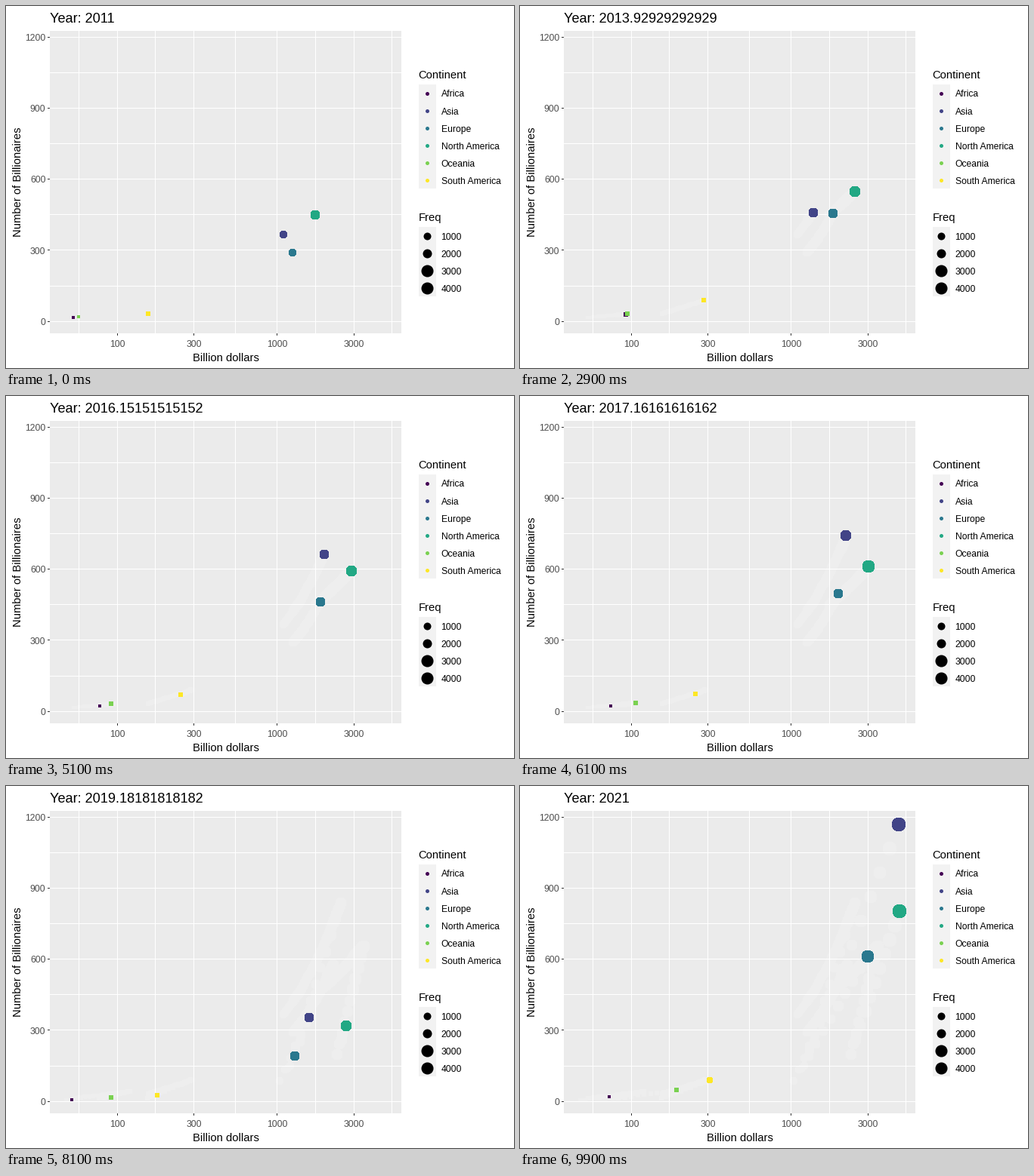
A matplotlib script that plays this animation: 672x480 px, repeating every 10 s.

```python
import numpy as np
import matplotlib.pyplot as plt
from matplotlib.animation import FuncAnimation
from matplotlib.patches import Rectangle

W, H, DPI = 672, 480, 96
FRAMES, INTERVAL = 100, 100
PT = 72 / DPI
FIRST, SPAN = 2011, 10
plt.rcParams["font.family"] = "Liberation Sans"

# Wealth in billion dollars at the turning points, then the number of
# billionaires: first value, growth exponent, last value.
YEARS = [2011, 2013, 2014, 2015, 2017, 2018, 2019, 2020]
CONTINENTS = {
    "Africa": ("#440154", [53, 70, 96, 87.5, 72, 48, 73], (17, 0.9, 19)),
    "Asia": ("#414487", [1092, 1233, 1380, 1747, 2131, 1204, 4682], (367, 1, 1169)),
    "Europe": ("#2A788E", [1250, 1486, 1861, 1780, 1901, 1034, 2982], (289, 1.2, 613)),
    "North America": ("#22A884", [1722, 2099, 2541, 2802, 2952, 2350, 4732], (449, 0.54, 803)),
    "Oceania": ("#7AD151", [57.5, 83, 96, 77.3, 103, 76, 192], (20, 1, 48)),
    "South America": ("#FDE725", [156, 279, 286, 253, 245, 154, 311], (33, 1.65, 91)),
}
COLORS = [c[0] for c in CONTINENTS.values()]
GROWTH_2018 = 1.17
SHARE_2019 = 0.37


def x_at(dollars):
    return 147 + 211.95 * (np.log10(dollars) - 2)


def y_at(count):
    return 418.25 - 47.15 / 150 * np.asarray(count)


def radius(dollars):
    share = np.clip((np.asarray(dollars) - 48) / 4684, 0, 1)
    return 1.9 + 7.1 * np.sqrt(share)


def area(r):
    return (2 * PT * np.asarray(r)) ** 2


def path(wealth, first, power, last):
    """Position and radius in every frame, straight between turning points."""
    d = np.insert(np.array(wealth, float), 5, GROWTH_2018 * wealth[4])
    n = first * (d / d[0]) ** power
    n[-2] *= SHARE_2019
    n[-1] = last
    keys = [round((FRAMES - 1) / SPAN * (y - FIRST)) for y in YEARS]
    return [np.interp(range(FRAMES), keys, v) for v in (x_at(d), y_at(n), radius(d))]


tracks = np.array([path(w, *n) for _, w, n in CONTINENTS.values()])
tracks = np.round(tracks).transpose(2, 0, 1)
POS, RAD = tracks[..., :2], tracks[..., 2]

fig = plt.figure(figsize=(W / DPI, H / DPI), dpi=DPI, facecolor="white")
ax = fig.add_axes([0, 0, 1, 1])
ax.set_xlim(0, W)
ax.set_ylim(H, 0)
ax.axis("off")


def box(x, y, w, h, color, zorder=1):
    ax.add_patch(Rectangle((x, y), w, h, fc=color, lw=0, antialiased=False,
                           zorder=zorder))


def text(x, y, s, px, color="black", **kw):
    return ax.text(x, y, s, fontsize=px * PT, color=color, **kw)


def dots(xy, r, colors, zorder=4):
    xy = np.reshape(xy, (-1, 2))
    return ax.scatter(xy[:, 0], xy[:, 1], s=area(r), c=colors, linewidths=0,
                      antialiased=False, zorder=zorder)


# Panel, grid and axes: every second line is a major one
box(58, 33, 465, 401, "#EBEBEB")
GREY = "#4D4D4D"
for count in range(0, 1201, 150):
    y = int(y_at(count))
    box(58, y, 465, 1, "white", 3)
    if count % 300 == 0:
        box(55, y, 3, 1, "#333333")
        text(52.5, y_at(count) + 4.8, str(count), 12.1, GREY, ha="right")

half = np.sqrt(3)
for dollars in (100, 300, 1000, 3000):
    x = int(x_at(dollars))
    box(x, 33, 1, 401, "white", 3)
    box(x, 434, 1, 3, "#333333")
    text(x + 0.3, 452, str(dollars), 12.1, GREY, ha="center")
for dollars in (100 / half, 100 * half, 300 * np.sqrt(10 / 3), 1000 * half, 3000 * half):
    box(int(x_at(dollars)), 33, 1, 401, "white", 3)

text(290.5, 471, "Billion dollars", 14.8, ha="center")
text(20, 233.5, "Number of Billionaires", 14.8, rotation=90,
     ha="center", rotation_mode="anchor")


def legend(title, top, labels, radii, colors):
    text(545.5, top - 8, title, 14.8)
    box(546, top, 23, 23 * len(labels), "#F2F2F2")
    for i, (label, r, color) in enumerate(zip(labels, radii, colors)):
        y = top + 11.5 + 23.04 * i
        dots((557, y), r, color)
        text(575.6, y + 5, label, 12.15)


legend("Continent", 104, CONTINENTS, [2.5] * 6, COLORS)
freqs = range(1000, 4001, 1000)
legend("Freq", 293, map(str, freqs) and [str(f) for f in freqs],
       np.round(radius(freqs)), ["black"] * 4)

title = text(57.7, 22, "", 18.15)
trail = dots(POS[0], RAD[0], "#EEEEEE", 2)
points = dots(POS[0], RAD[0], COLORS)


def update(i):
    title.set_text(f"Year: {FIRST + SPAN * i / (FRAMES - 1):.15g}")
    trail.set_offsets(POS[:i].reshape(-1, 2))
    trail.set_sizes(area(RAD[:i].ravel()))
    points.set_offsets(POS[i])
    points.set_sizes(area(RAD[i]))
    return title, trail, points


anim = FuncAnimation(fig, update, frames=FRAMES, interval=INTERVAL,
                     repeat=True, repeat_delay=0, blit=False)
plt.show()
```
